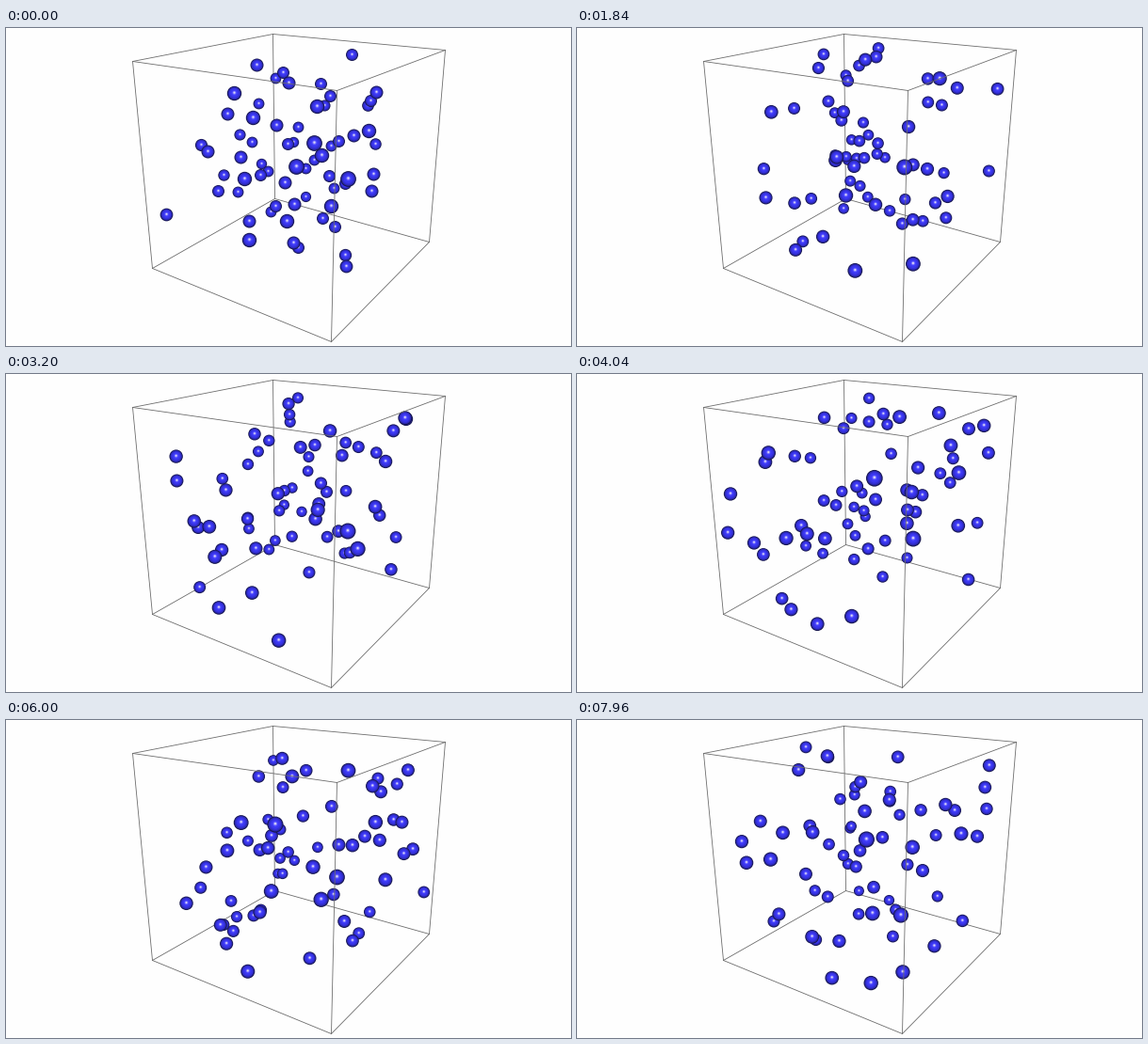
These frames come from a looping animation (600 px wide and 338 px high, 8 s). A matplotlib script:

```python
import itertools

import matplotlib.pyplot as plt
import numpy as np
from matplotlib.animation import FuncAnimation

W, H, DPI = 600, 338, 100
FRAMES, STEP = 200, 40
SPEED = 0.16      # spread of each velocity component, box sides per second
MARGIN = 0.03     # ball radius in box sides
RADIUS = 5.3      # ball radius in pixels at the far bottom corner

# Box corners (x, y, z) on screen; (0, 0, 0) is the far bottom one
CORNERS = {
    (0, 0, 0): (285, 181), (1, 0, 0): (155, 255),
    (0, 1, 0): (449, 227), (1, 1, 0): (345, 333),
    (0, 0, 1): (283, 6), (1, 0, 1): (134, 35),
    (0, 1, 1): (466, 23), (1, 1, 1): (351, 66),
}

# Balls at the start, grouped by apparent radius
START = {
    8.4: [(327, 122), (308, 147), (363, 160)],
    7.7: [(330, 83), (262, 95), (385, 109), (298, 205), (258, 225),
          (242, 69), (253, 160), (345, 189), (335, 135)],
    7.0: [(300, 58), (393, 68), (235, 91), (287, 103), (369, 114),
          (214, 131), (249, 137), (296, 164), (390, 155), (388, 173),
          (258, 205), (305, 228), (266, 39), (306, 187)],
    6.5: [(367, 28), (344, 72), (334, 59), (207, 124), (343, 157),
          (170, 198), (225, 173), (336, 202), (349, 211), (360, 241),
          (361, 253), (310, 233), (294, 47), (360, 165), (353, 120),
          (286, 189), (270, 156), (387, 77), (299, 123)],
    5.9: [(286, 53), (268, 80), (338, 82), (384, 82), (248, 113),
          (310, 105), (345, 125), (392, 123), (231, 156), (318, 149),
          (327, 140), (278, 152), (348, 170), (281, 195)],
    5.4: [(261, 121), (305, 121), (271, 144), (246, 174), (318, 179)],
}

# Shading rings of one ball: relative size, colour
RINGS = [(1.0, "#17174f"), (0.88, "#2a27a8"), (0.76, "#332fd2"),
         (0.6, "#3a36ee"), (0.4, "#423ef9"), (0.25, "#7d78ff"),
         (0.13, "#dcd8f4")]
SCALE = np.array([s for s, _ in RINGS])
LIFT = 0.12 * (1 - SCALE)


def fit_camera():
    """Least-squares perspective matrix through the box corners."""
    rows, rhs = [], []
    for p, (u, v) in CORNERS.items():
        q = np.array([*p, 1.0])
        rows.append([*q, 0, 0, 0, 0, *(-u * q[:3])])
        rows.append([0, 0, 0, 0, *q, *(-v * q[:3])])
        rhs += [u, v]
    sol = np.linalg.lstsq(np.array(rows), np.array(rhs), rcond=None)[0]
    return np.append(sol, 1.0).reshape(3, 4)


CAMERA = fit_camera()


def project(points):
    h = points @ CAMERA[:, :3].T + CAMERA[:, 3]
    return h[:, :2] / h[:, 2:], h[:, 2]


def unproject(u, v, radius):
    """Point inside the box seen at (u, v) with about the given radius."""
    depth = np.linspace(0.5, 1.05, 400)
    rays = depth[:, None] * np.array([u, v, 1.0]) - CAMERA[:, 3]
    pts = rays @ np.linalg.inv(CAMERA[:, :3]).T
    outside = np.abs(pts - np.clip(pts, MARGIN, 1 - MARGIN)).sum(axis=1)
    cost = np.abs(depth - RADIUS / radius) + 20 * outside
    return pts[np.argmin(cost)]


def bounce(points):
    """Fold straight paths back at the walls."""
    span = 1 - 2 * MARGIN
    return MARGIN + span - np.abs((points - MARGIN) % (2 * span) - span)


home = np.array([unproject(u, v, r) for r, spots in START.items()
                 for u, v in spots])
rng = np.random.default_rng(7)
velocity = rng.normal(0, SPEED, home.shape)

fig = plt.figure(figsize=(W / DPI, H / DPI), dpi=DPI, facecolor="#fefefe")
ax = fig.add_axes([0, 0, 1, 1])
ax.set(xlim=(0, W), ylim=(H, 0))
ax.axis("off")

for a, b in itertools.combinations(CORNERS, 2):
    if sum(i != j for i, j in zip(a, b)) == 1:
        (x0, y0), (x1, y1) = CORNERS[a], CORNERS[b]
        front = (1, 1, 1) in (a, b)
        ax.plot([x0 + 0.5, x1 + 0.5], [y0 + 0.5, y1 + 0.5], color="#6c6c6c",
                lw=0.6, zorder=3 if front else 1)

count = len(home)
balls = ax.scatter(np.zeros(count * len(RINGS)), np.zeros(count * len(RINGS)),
                   s=np.arange(1, count * len(RINGS) + 1), linewidths=0,
                   c=[c for _, c in RINGS] * count, zorder=2)


def draw(frame):
    seconds = frame * STEP / 1000
    spots, depth = project(bounce(home + velocity * seconds))
    order = np.argsort(-depth)
    spots, radius = spots[order] + 0.5, RADIUS / depth[order]
    x = np.repeat(spots[:, 0], len(RINGS))
    y = (spots[:, 1:] - radius[:, None] * LIFT).ravel()
    balls.set_offsets(np.column_stack([x, y]))
    balls.set_sizes((2 * np.outer(radius, SCALE).ravel() * 72 / DPI) ** 2)
    return (balls,)


anim = FuncAnimation(fig, draw, frames=FRAMES, interval=STEP, repeat=True,
                     repeat_delay=0, blit=False)
plt.show()
```
